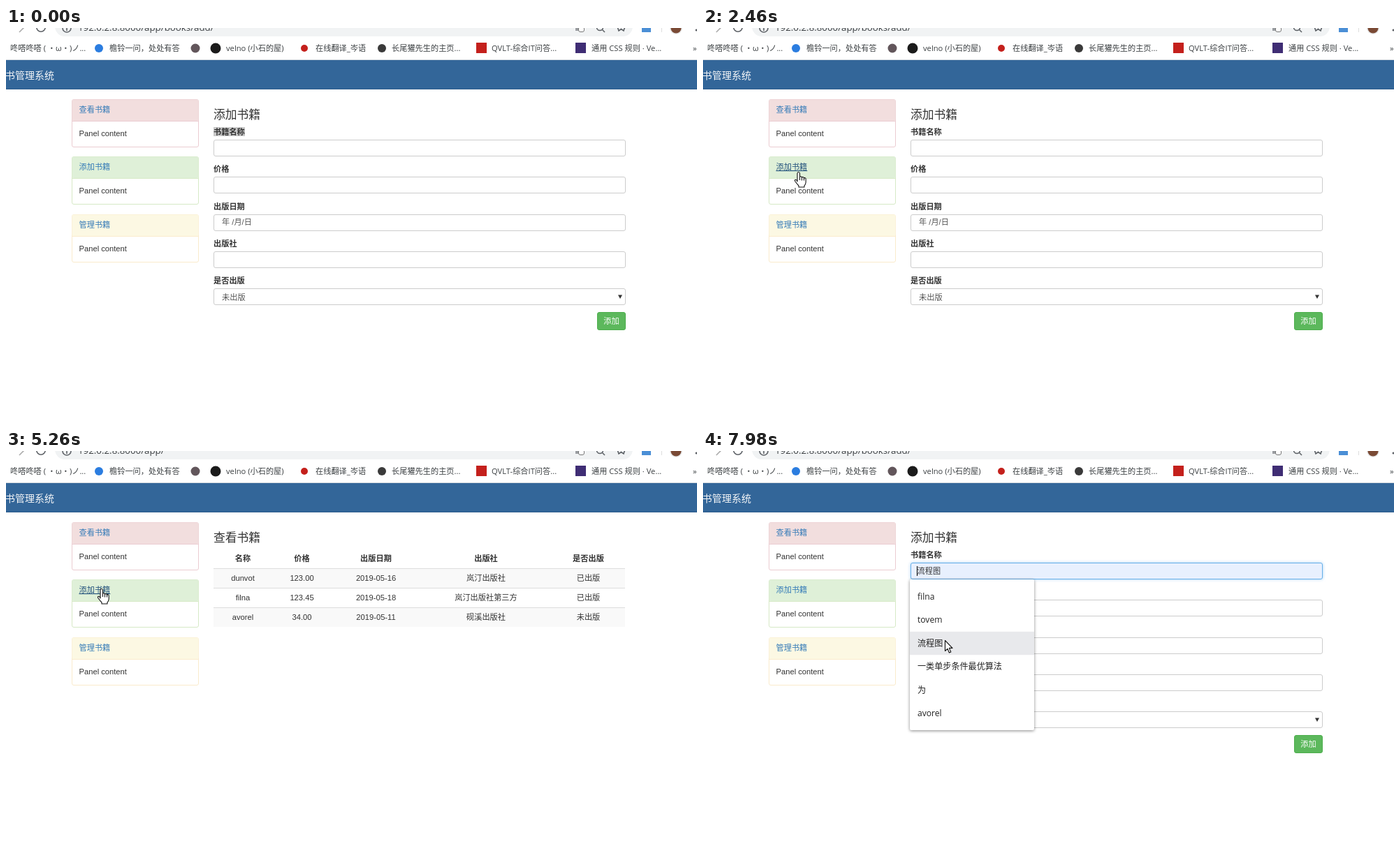
These frames come from a looping animation (989 by 566 pixels, 8 s). An HTML page:

```html
<!DOCTYPE html>
<html lang="zh">
<head>
<meta charset="utf-8">
<title>书管理系统</title>
<style>
html, body { margin: 0; height: 100%; overflow: hidden; background: #fff; }
svg { display: block; width: 989px; height: 566px; }
text { font: 11.2px "Liberation Sans", "Noto Sans CJK SC", sans-serif; fill: #333; white-space: pre; }
.ui { font-family: "Open Sans", "Noto Sans CJK SC", sans-serif; fill: #3c4043; }
.url { font-size: 13.3px; }
.item { font-size: 12.1px; fill: #222; }
.h { font-size: 16.8px; }
.nav { font-size: 14px; fill: #f4f6f8; }
.b { font-weight: bold; }
.mid { text-anchor: middle; }
.white { fill: #fff; }
.dim { fill: #555; }
.link { fill: #337ab7; }
.link.on { fill: #23527c; text-decoration: underline; }
.icon { fill: none; stroke: #5f6368; stroke-width: 1.6; }
</style>
</head>
<body>
<svg id="stage" viewBox="0 0 989 566"></svg>
<script>
const text = (x, y, s, cls = '', id = '') => `<text x="${x}" y="${y}" class="${cls}" id="${id}">${s}</text>`;
const rect = (x, y, w, h, fill, more = '') => `<rect x="${x}" y="${y}" width="${w}" height="${h}" fill="${fill}" ${more}/>`;
const dot = (x, y, r, fill) => `<circle cx="${x}" cy="${y}" r="${r}" fill="${fill}"/>`;
const path = (d, more = 'class="icon"') => `<path d="${d}" ${more}/>`;
const group = (id, s, more = '') => `<g id="${id}" ${more}>${s}</g>`;
const box = (x, y, w, h, fill, line, more = '') =>
  rect(x + .5, y + .5, w - 1, h - 1, fill, `stroke="${line}" rx="2.5" ${more}`);
const button = (x, y, s, red, cls = '') =>
  box(x, y, 41, 26, red ? '#d9534f' : '#5cb85c', red ? '#d43f3a' : '#4cae4c') +
  text(x + 20.5, y + 16.5, s, 'mid white ' + cls);

const links = ['查看书籍', '添加书籍', '管理书籍'];
const items = ['filna', 'tovem', '流程图', '一类单步条件最优算法', '为', 'avorel'];
const books = [
  ['dunvot', '123.00', '2019-05-16', '岚汀出版社', '已出版'],
  ['filna', '123.45', '2019-05-18', '岚汀出版社第三方', '已出版'],
  ['avorel', '34.00', '2019-05-11', '砚溪出版社', '未出版'],
];
const heads = ['名称', '价格', '出版日期', '出版社', '是否出版', '删除', '编辑'];
const fieldY = i => 160 + Math.round(i * 53.35);
const itemY = i => 192 + i * 33.4;

function browser() {
  const marks = [[6, '咚嗒咚嗒 ( ・ω・)ノ...'], [148, '檐铃一问，处处有答'], [315, 'velno (小石的屋)'],
    [443, '在线翻译_岑语'], [552, '长尾獾先生的主页...'], [695, 'QVLT-综合IT问答...'],
    [838, '通用 CSS 规则 · Ve...'], [983, '»']];
  const dots = [[133, 6, '#2b7de0'], [271, 6.5, '#62565b'], [300, 7.5, '#1b1b1b'], [427, 5, '#c4201c'], [538, 6, '#3a3a3a']];
  return rect(70, -20, 827, 32, '#f1f3f4', 'rx="14"') +
    path('M19 6L27 -2', 'class="icon" style="stroke:#aaa"') +
    group('reload', '<circle cx="50" cy="-1" r="6.2"/>', 'class="icon"') +
    group('stop', path('M44.5 5.500L50 0L55.500 5.500')) +
    '<circle cx="87" cy="0" r="6" class="icon"/>' + path('M87 -1V4') +
    text(103, 4, '', 'ui url', 'url') +
    rect(815, -5, 8, 9, '#9a9da1') + box(819, -2, 9, 8, '#fff', '#777') +
    '<circle cx="850" cy="-1" r="4.500" class="icon"/>' + path('M853 2L857 6') +
    path('M875 -2L877 4L880.500 1.500L884 4L886 -2') +
    rect(910, -6, 13, 12, '#4b8fd6') + rect(938, 0, 1, 6, '#ddd') +
    dot(959, 0, 9, '#e4e4e4') + dot(959, 0, 7.5, '#7a4a35') + dot(988, 3, 1.5, '#5f6368') +
    dots.map(([x, r, c]) => dot(x, 29, r, c)).join('') +
    rect(673, 21, 15, 15, '#c4201c') + rect(815, 21, 15, 15, '#3f2d74') +
    marks.map(([x, s]) => text(x, 33, s, 'ui')).join('') +
    rect(0, 45, 989, 1, '#d8dce0') +
    rect(0, 46, 989, 42, '#336699') + rect(0, 87, 989, 1, '#2a5a8c') +
    text(-1, 73, '书管理系统', 'nav');
}

function panels() {
  const colors = [['#f2dede', '#ebccd1'], ['#dff0d8', '#d6e9c6'], ['#fcf8e3', '#faebcc']];
  return links.map((s, i) => {
    const y = 102 + Math.round(i * 82.4), [fill, line] = colors[i];
    return box(94, y, 182, 69, '#fff', line) + rect(94.5, y + .5, 181, 30.5, fill, 'rx="2"') +
      rect(94, y + 31, 182, 1, line) +
      text(104.5, y + 19, s, 'link', 'link' + i) + text(104.5, y + 53, 'Panel content');
  }).join('');
}

function form() {
  const labels = ['书籍名称', '价格', '出版日期', '出版社', '是否出版'];
  return text(297, 130, '添加书籍', 'h') + rect(297, 142, 45, 13, '#c8c8c8', 'id="mark"') +
    labels.map((s, i) => text(297, fieldY(i) - 7.5, s, 'b') +
      box(297, fieldY(i), 590, 24, '#fff', '#ccc', `id="field${i}"`)).join('') +
    text(309, 282, '年 /月/日', 'dim') + text(309, 390, '未出版', 'dim') +
    path('M876 382.500H882L879 388Z', 'fill="#333"') + button(846, 407, '添加') +
    text(306.5, 176, '', '', 'value') + rect(306, 165, 1, 14, '#000', 'id="caret"') +
    group('menu',
      rect(296, 184, 178, 216, '#fff', 'rx="2" style="filter:drop-shadow(0 1px 2px #0007)"') +
      rect(296, 0, 178, 33.4, '#e8e9ec', 'id="pick"') +
      items.map((s, i) => text(307, itemY(i) + 21, s, 'ui item')).join(''));
}

function table(title, cols, rowH) {
  const row = (cells, y, cls) => cells.slice(0, cols.length).map((s, i) => text(cols[i], y, s, 'mid ' + cls)).join('');
  return text(297, 130, title, 'h') + row(heads, 157.5, 'b') +
    books.map((cells, i) => {
      const y = 168 + Math.round(i * rowH);
      return rect(297, y, 589, rowH, i % 2 ? '#fff' : '#f9f9f9') + rect(297, y, 589, 1, '#ddd') +
        row(cells, y + rowH / 2 + 3.8, '') +
        (cols.length > 5 ? button(754.5, y + 6, '删除', true, 'b') + button(828, y + 6, '编辑', false, 'b') : '');
    }).join('');
}

const outline = 'fill="#fff" stroke="#111" stroke-width="1.1" stroke-linejoin="round"';
const pointers = {
  arrow: path('M.5 .5V15.500L4 12.300L6.400 18L8.800 17L6.400 11.400H11Z', outline),
  hand: path('M-2 14V2.500Q-2 .5 -.3 .5T1.500 2.500V8Q1.500 6.500 3 6.700T4.500 8.500Q4.700 7.300 6 7.500T7.500 9.500Q8 8.300 9.200 8.800T10.200 10.800V15Q10 18 8 20V22H0V20Q-2 18 -5.300 13.500Q-6 11.500 -4.500 11.300T-2 14ZM1.500 8V12M4.500 8.500V12.500M7.500 9.500V12.500', outline),
  beam: path('M-3 -6.500H-1Q0 -6.500 0 -5.500Q0 -6.500 1 -6.500H3M0 -5.500V5.500M-3 6.500H-1Q0 6.500 0 5.500Q0 6.500 1 6.500H3', 'fill="none" stroke="#222"'),
};

const stage = document.getElementById('stage');
stage.innerHTML = browser() + panels() + group('add', form()) +
  group('list', table('查看书籍', [339, 423.5, 529.5, 687, 833.5], 28)) +
  group('manage', table('管理书籍', [328, 391.5, 471, 590, 699.5, 775, 848.5], 38)) +
  group('pointer', Object.entries(pointers).map(([id, s]) => group(id, s)).join(''));

const $ = id => document.getElementById(id);
const show = (id, on) => { $(id).style.display = on ? '' : 'none'; };

const visits = [[0, 'add'], [980, 'list'], [2450, 'add'], [3400, 'manage'], [4720, 'list'], [5570, 'add']];
const urls = { add: 'books/add/', list: '', manage: 'books/manage/' };
// time, x, y of the pointer tip
const track = [
  [200, 862, 484], [770, 143, 118], [980, 143, 118], [1350, 165, 165], [1690, 134, 208], [1900, 134, 208],
  [1910, 137, 205], [2210, 137, 200], [2450, 137, 200], [2770, 137, 282], [2930, 137, 282], [3010, 133, 282],
  [3490, 133, 282], [3900, 174, 205], [4330, 145, 120], [4410, 144, 120], [4720, 144, 120], [5110, 137, 191],
  [5250, 137, 191], [5260, 137, 197], [5360, 137, 200], [5570, 137, 200], [6280, 364, 167], [6770, 364, 167],
  [6910, 361, 201], [7160, 361, 211], [7330, 361, 211], [7750, 346, 271], [8000, 346, 271],
];

function pointerAt(t) {
  const i = Math.max(1, track.findIndex(k => k[0] > t));
  const [t0, x0, y0] = track[i - 1], [t1, x1, y1] = track[i];
  const k = Math.max(0, (t - t0) / (t1 - t0)), e = k * (2 - k);
  return [Math.round(x0 + (x1 - x0) * e), Math.round(y0 + (y1 - y0) * e)];
}

function draw(t) {
  const [x, y] = pointerAt(t);
  const page = visits.filter(v => v[0] <= t).pop()[1];
  const loading = visits.some(([at]) => t >= at - 70 && t < at);
  const focus = t >= 6370, open = t >= 6450;

  for (const id in urls) show(id, id === page);
  $('url').textContent = '192.0.2.8:8000/app/' + urls[page];
  show('stop', loading);
  show('reload', !loading);
  $('reload').style.stroke = t >= 980 && t < 2380 || t >= 3400 && t < 4650 ? '#3b3f8c' : '';

  const over = t < 200 ? -1 : links.findIndex((s, i) =>
    x >= 104 && x <= 149 && Math.abs(y - 117.5 - i * 82.4) < 7);
  links.forEach((s, i) => $('link' + i).classList.toggle('on', i === over));

  const typing = page === 'add' && x > 297 && x < 887 &&
    [0, 1, 2, 3].some(i => y >= fieldY(i) && y < fieldY(i) + 24) && !(open && y > 184);
  const kind = over >= 0 ? 'hand' : typing ? 'beam' : 'arrow';
  for (const id in pointers) show(id, id === kind);
  show('pointer', t >= 200);
  $('pointer').setAttribute('transform', `translate(${x} ${y})`);

  const pick = open && y >= 192 ? Math.floor((y - 192) / 33.4) : -1;
  show('mark', t < 980);
  show('menu', open);
  show('pick', pick >= 0);
  show('caret', focus && (t < 7440 || t >= 7970));
  $('pick').setAttribute('y', itemY(pick));
  $('value').textContent = items[pick] || '';
  const field = $('field0').style;
  field.fill = pick >= 0 ? '#e8f0fe' : '';
  field.stroke = focus ? '#66afe9' : '';
  field.filter = focus ? 'drop-shadow(0 0 2px #66afe999)' : '';
}

const start = performance.now();
function tick() {
  draw((performance.now() - start) % 8000);
  requestAnimationFrame(tick);
}
tick();
</script>
</body>
</html>
```
